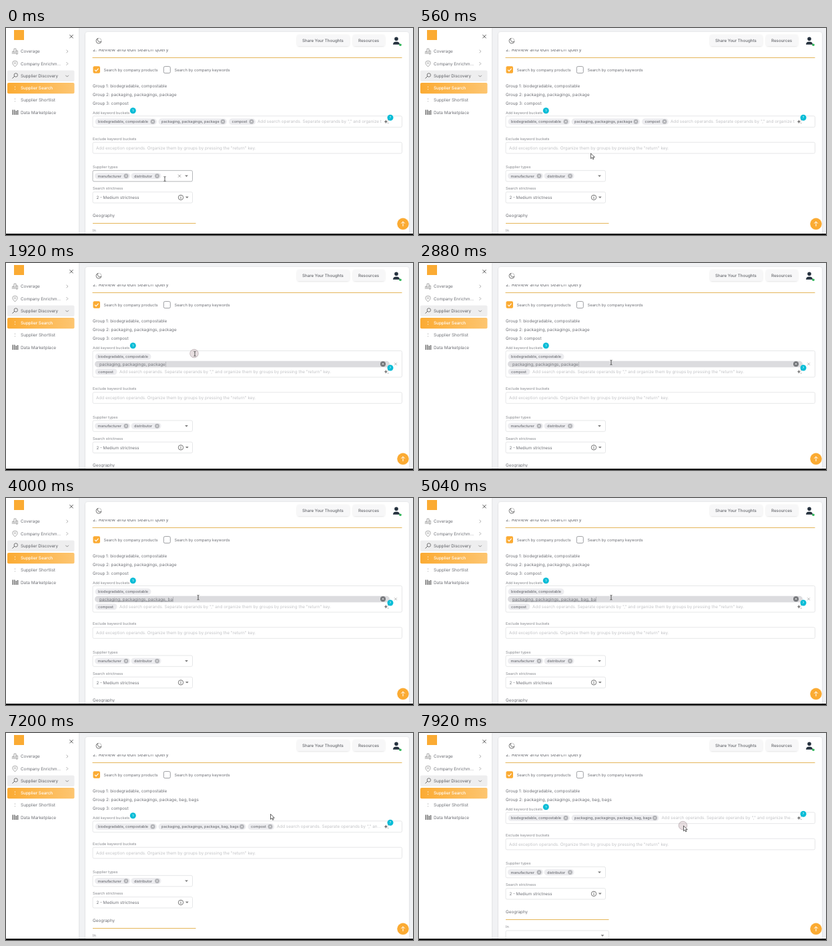
Animation, 610 px wide and 310 px high, one loop 8000 ms. Source, as an HTML page:

```html
<!DOCTYPE html>
<html lang="en">
<head>
<meta charset="utf-8">
<title>Supplier search</title>
<style>
  html, body { margin: 0; width: 100%; height: 100%; overflow: hidden; background: #f1f2f4; }
  svg { display: block; width: 610px; height: 310px; }
  text { font-family: Inter, Roboto, sans-serif; text-rendering: geometricPrecision; white-space: pre; }
  .checked { text-decoration: underline dotted #c79aa4 .5px; }
</style>
</head>
<body>
<svg viewBox="0 0 610 310" xmlns="http://www.w3.org/2000/svg">
  <defs>
    <clipPath id="title"><rect x="120" y="32" width="300" height="10"/></clipPath>
    <clipPath id="field"><rect x="130" y="110" width="433" height="70"/></clipPath>
    <linearGradient id="active"><stop stop-color="#fbab33"/><stop offset="1" stop-color="#fdc570"/></linearGradient>
    <filter id="soft" x="-20%" y="-40%" width="140%" height="190%">
      <feDropShadow dx="0" dy=".5" stdDeviation=".9" flood-opacity=".15"/>
    </filter>
  </defs>
  <g id="frame"></g>
  <g id="form"></g>
  <g id="chrome"></g>
  <circle id="ring" r="6.3" fill="#b89aa2" fill-opacity=".32" stroke="#8d7a80" stroke-opacity=".6" stroke-width=".7"/>
  <g id="pointer"></g>
  <rect y="308" width="610" height="2" fill="#000"/>
</svg>
<script>
const LOOP = 8000;
const OPEN = 1840, CLOSE = 6320, REMOVE = 7840;
const ORANGE = '#fbab33', CYAN = '#06bcd6', INK = '#6e7076', DIM = '#c2c3c6', LABEL = '#85878c', EDGE = '#e0e1e3';
const HINT = 'Add search operands. Separate operands by "," and organize them by groups by pressing the "return" key.';
const WORDS = 'packaging, packagings, package';
const EXTRA = ', bag, bags';
const KEYS = [3040, 3200, 3440, 3760, 4160, 4560, 4640, 4800, 4960, 5200, 5440];

// time, x, y of the pointer's hot spot
const PATH = [
  [0, 238, 226], [160, 238, 226], [1040, 283, 138], [1520, 283, 138], [1760, 283, 136],
  [2080, 283, 136], [2560, 288, 149], [6320, 288, 149], [7040, 396.5, 121.5],
  [7360, 396.5, 121.5], [7680, 396.5, 139], [8000, 396.5, 139]
];
const CLICKS = [[1760, 2160], [7760, 8000]];

const $ = id => document.getElementById(id);
const text = (x, y, s, size = 6.3, fill = INK, more = '') =>
  `<text x="${x}" y="${y + size * .36}" font-size="${size}" fill="${fill}" ${more}>${s}</text>`;
const rect = (x, y, w, h, fill, r = 0, more = '') =>
  `<rect x="${x}" y="${y}" width="${w}" height="${h}" rx="${r}" fill="${fill}" ${more}/>`;
const disc = (x, y, r, fill) => `<circle cx="${x}" cy="${y}" r="${r}" fill="${fill}"/>`;
const loop = (x, y, r, stroke, w) =>
  `<circle cx="${x}" cy="${y}" r="${r}" fill="none" stroke="${stroke}" stroke-width="${w}"/>`;
const line = (d, stroke, w = .8) =>
  `<path d="${d}" fill="none" stroke="${stroke}" stroke-width="${w}"/>`;
const cross = (x, y, r, stroke, w = .7) =>
  line(`M${x - r} ${y - r}l${2 * r} ${2 * r}m0 ${-2 * r}l${-2 * r} ${2 * r}`, stroke, w);
const box = (x, y, w, h, edge = EDGE) => rect(x, y, w, h, '#fff', 2, `stroke="${edge}" stroke-width=".8"`);
const arrow = (x, y) => `<path d="M${x - 2.4} ${y - 1.2}h4.8l-2.4 2.5z" fill="#777"/>`;
const medium = 'font-weight="500"';

const badge = (x, y) => disc(x, y, 4.5, CYAN) + text(x, y, '?', 5.4, '#fff', 'text-anchor="middle"');
const sparkle = (x, y) =>
  `<path d="M${x - .6} ${y - 3}q.3 2.700 2.700 3q-2.400.3-2.700 3q-.3-2.700-2.700-3q2.400-.3 2.700-3z" fill="#777"/>` +
  disc(x + 2.6, y - 2.3, .6, '#777') + disc(x + 2.6, y + 2.3, .6, '#777');

const pill = (x, y, w, fill = '#ececef') => rect(x - 4.5, y - 4.6, w, 9.2, fill, 4.6);
const plainChip = (x, y, label, w) => pill(x, y, w) + text(x, y, label, 5.5, INK, medium);
// x is the left side of the text; end is the centre of the delete disc
const chip = (x, y, label, end, fill) =>
  pill(x, y, end - x + 10.5, fill) + text(x, y, label, 5.5, INK, medium) +
  disc(end, y, 3.4, '#b0b1b5') + cross(end, y, 1.3, '#fff');

const dots = (y, fill) => disc(13.5, y - 1.8, .6, fill) + disc(13.5, y + 1.8, .6, fill);

function drawFrame() {
  $('frame').innerHTML = rect(0, 0, 610, 310, '#f1f2f4') +
    rect(119, 6, 485, 320, '#fff', 4, 'filter="url(#soft)"') +
    rect(0, 0, 109, 310, '#fff', 0, 'filter="url(#soft)"');
  $('chrome').innerHTML =
    rect(12, 3, 15, 15, ORANGE) +
    cross(98, 12.7, 2.6, '#444', .9) +
    line('M9.5 39v-4h2.500v4m0 0v-8h3v8m0 0v-5h2.500v5z', '#888', .7) + text(22, 35, 'Coverage') +
    line('M13.500 58q-3.800-3.500-3.800-5.500a3.800 3.300 0 0 1 7.600 0q0 2-3.800 5.500z', '#888', .7) +
    loop(13.5, 52.6, 1.2, '#888', .6) + text(22, 53.3, 'Company Enrichm...') +
    line('M90.5 32.7l2.3 2.300-2.300 2.300M90.500 51.200l2.300 2.300-2.300 2.300', '#999') +
    rect(2, 63.5, 100.5, 16.5, '#eeeeef', 2) +
    line('M12.8 72.2l-3.3 3.3', '#555', .9) + loop(14.8, 70.5, 2.7, '#555', .8) +
    text(22, 71.7, 'Supplier Discovery', 6.3, '#5c5e63') + line('M89.3 70.800l2.300 2.300 2.300-2.300', '#777') +
    rect(2, 82, 100.5, 16.2, 'url(#active)', 2) + dots(90, '#fff') + text(22, 90, 'Supplier Search', 6.35, '#fff', medium) +
    dots(108, '#aaa') + text(22, 108, 'Supplier Shortlist', 6.45) +
    line('M10.300 122.500v7.500m2.500-7.500v7.500m2.500-6v6m2.300-7v7', '#666', 1.4) + text(22, 126.3, 'Data Marketplace', 6.38) +
    line('M138.2 15.300a4 4 0 1 0 4.800 4.500a2.700 2.700 0 0 1-4.800-4.500z', '#555') +
    line('M139.500 15.200a4 4 0 0 1 3.500 4', '#999', .6) +
    rect(436.5, 10.6, 78, 16.4, '#f7f7f8', 3, 'filter="url(#soft)"') + text(444, 19, 'Share Your Thoughts', 6.15, '#66686d', medium) +
    rect(520.5, 10.6, 47, 16.4, '#f7f7f8', 3, 'filter="url(#soft)"') + text(528, 19, 'Resources', 6.2, '#66686d', medium) +
    disc(585, 16.3, 2.8, '#26323f') + '<path d="M580 24.800q0-4.300 5-4.300t5 4.300z" fill="#26323f"/>' +
    disc(591, 25.2, 1.8, '#2fb457') +
    disc(595, 293.3, 8.7, ORANGE) + line('M595 297v-7m-2.800 2.700l2.800-2.800 2.800 2.800', '#fff', 1);
}

function editBox(s) {
  return box(130, 131.5, 463.5, 39.5) +
    plainChip(138, 140.2, 'biodegradable, compostable', 84) +
    rect(133, 146.8, 442, 9.4, '#dcdcdf', 4.7) +
    `<text x="140" y="153.500" font-size="6.35" fill="#77797f">` +
    `<tspan class="${s.typed ? 'checked' : ''}">${WORDS + EXTRA.slice(0, s.typed)}</tspan>` +
    `<tspan dx="-.6" font-weight="300">|</tspan></text>` +
    disc(565, 151.2, 4, '#737579') + cross(565, 151.2, 1.5, '#fff') +
    cross(584, 151.3, 1.9, s.red ? '#e58a8c' : '#999') +
    plainChip(138, 162.8, 'compost', 33) + text(170, 162.8, HINT, 6.3, DIM) +
    sparkle(570, 162.8) + badge(576, 157);
}

function keywordBox(s) {
  if (s.open) return editBox(s);
  const y = s.removed ? 127.2 : 140.2;
  let out = box(130, y - 8.4, 463.5, 16.8, s.hover ? '#b9babd' : EDGE) +
    chip(138, y, 'biodegradable, compostable', 220) +
    chip(233, y, s.done ? WORDS + EXTRA : WORDS, s.done ? 353.5 : 325, s.chip ? '#d3d3d7' : undefined);
  if (!s.removed) out += s.done ? chip(367, y, 'compost', 396) : chip(338.5, y, 'compost', 368);
  const start = s.removed ? 363.5 : s.done ? 406 : 377;
  const cut = s.removed ? 'organize the' : 'by "," an';
  const hint = s.done ? HINT.slice(0, HINT.indexOf(cut) + cut.length) + '...' : HINT;
  out += `<g clip-path="url(#field)">${text(start, y, hint, 6.3, DIM)}</g>` +
    sparkle(570, y) + badge(576, y - 6);
  return s.hover ? out + cross(584, y, 2, '#777') : out;
}

function lower(s) {
  return text(130, 165.8, 'Exclude keyword buckets', 5.45, LABEL) +
    box(130, 171.2, 463.5, 16.6) +
    text(135, 179.7, 'Add exception operands. Organize them by groups by pressing the "return" key.', 6.33, DIM) +
    text(130, 208.4, 'Supplier types', 5.5, LABEL) +
    box(130, 213.4, 149.5, 16.4, s.types ? '#a4a6aa' : EDGE) +
    chip(137.5, 221.6, 'manufacturer', 180) + chip(192, 221.6, 'distributor', 226.5) +
    (s.types ? cross(260, 221.6, 2, '#777') : '') + arrow(270.5, 221.6) +
    text(130, 240.3, 'Search strictness', 5.5, LABEL) +
    box(130, 245.6, 149.5, 16.4) + text(135.5, 253.8, '2 - Medium strictness', 6.2) +
    loop(262, 253.8, 3.7, '#555', .8) +
    line('M262 253.200v2.600m0-4.300v.9', '#555', .9) + arrow(271.3, 253.8) +
    text(130, 280.5, 'Geography', 6.35) + rect(130, 292, 154.5, 1, '#e5b65a') +
    text(130, 303.3, 'In', 5.5, LABEL) + box(130, 308.9, 154.5, 16.5) + arrow(275, 316.5);
}

function drawForm(s) {
  const tick = rect(130.5, 57.3, 10.5, 10.5, ORANGE, 2) + line('M133 62.600l2 2 3.600-4', '#fff', 1.1);
  const rise = s.removed ? -13 : 0;
  $('form').innerHTML =
    `<g clip-path="url(#title)">${text(130, 31.8, '2. Review and edit search query', 7.5)}</g>` +
    rect(129.5, 44, 464, 1, '#e5b65a') +
    tick + text(146.5, 62.6, 'Search by company products', 5.85) +
    rect(236.3, 57.6, 10, 10, '#fff', 2, 'stroke="#85878b" stroke-width=".8"') +
    text(252.5, 62.6, 'Search by company keywords', 5.85) +
    text(130, 87, 'Group 1: biodegradable, compostable') +
    text(130, 100, 'Group 2: ' + WORDS + (s.done ? EXTRA : '')) +
    (s.removed ? '' : text(130, 113, 'Group 3: compost')) +
    text(130, 126.6 + rise, 'Add keyword buckets', 5.4, LABEL) + badge(190.3, 123.8 + rise) +
    keywordBox(s) +
    `<g transform="translate(0 ${s.open ? 22.5 : rise})">${lower(s)}</g>`;
}

const POINTERS = {
  beam: line('M-1.500-3.500q1.500 0 1.500 1v5q0 1-1.500 1m3-7q-1.500 0-1.500 1m0 5q0 1 1.500 1', '#333', .8),
  arrow: '<path d="M0 0v7.800l1.900-1.700 1.300 2.700 1.300-.6-1.300-2.600h2.600z" fill="#fff" stroke="#222" stroke-width=".7"/>',
  hand: '<path d="M-.8 0q.8-.9 1.600 0v2.600l3 .8q.9.400.7 1.500l-.5 3.100h-4.100l-2.400-3q.2-1.300 1.700-.1z" fill="#fff" stroke="#222" stroke-width=".7"/>'
};

const ease = p => p * p * (3 - 2 * p);
function pointerAt(t) {
  const i = Math.max(1, PATH.findIndex(k => k[0] > t));
  const [t0, x0, y0] = PATH[i - 1], [t1, x1, y1] = PATH[i];
  const p = ease((t - t0) / (t1 - t0));
  return [x0 + (x1 - x0) * p, y0 + (y1 - y0) * p];
}

let lastKey = '', lastKind = '';
function render(t) {
  const [x, y] = pointerAt(t);
  const done = t >= CLOSE, open = t >= OPEN && !done, removed = t >= REMOVE;
  const hover = !open && !removed && y > 131.5 && y < 149;
  const s = {
    open, done, removed, hover,
    chip: hover && !done && x > 229 && x < 331,
    types: t < OPEN && y > 213 && y < 230,
    red: open && t >= 5920,
    typed: KEYS.filter(k => k <= t).length
  };
  const key = JSON.stringify(s);
  if (key !== lastKey) drawForm(s);
  lastKey = key;

  const kind = open || s.types ? 'beam' : s.chip ? 'hand' : 'arrow';
  if (kind !== lastKind) $('pointer').innerHTML = POINTERS[kind];
  lastKind = kind;
  $('pointer').setAttribute('transform', `translate(${x.toFixed(2)} ${y.toFixed(2)})`);
  $('ring').setAttribute('transform', `translate(${x - 1} ${y - .5})`);
  $('ring').style.display = CLICKS.some(([a, b]) => t >= a && t < b) ? '' : 'none';
}

drawFrame();
const begin = performance.now();
function tick() {
  render((performance.now() - begin) % LOOP);
  requestAnimationFrame(tick);
}
tick();
</script>
</body>
</html>
```
